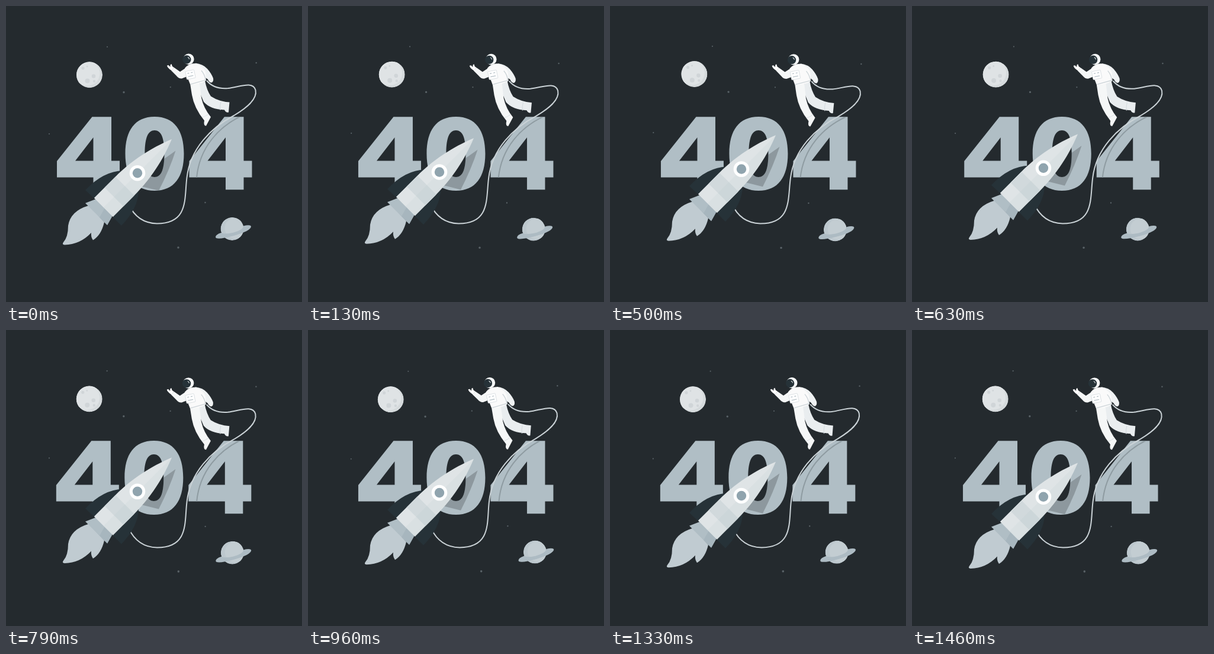
Write an HTML page that moves like this. It is 500 px wide and 500 px high and loops after 1500 ms.

```html
<!DOCTYPE html>
<html lang="en">
<head>
<meta charset="utf-8">
<title>404</title>
<style>
html, body { margin: 0; width: 100%; height: 100%; overflow: hidden; background: #242a2e; }
svg { display: block; width: 100%; height: 100%; }
</style>
</head>
<body>
<svg viewBox="0 0 500 500">
  <defs>
    <path id="four" d="M145.500 187.300H178V261.500H192V289.500H178V310.300H147.500V289.500H86V262ZM147.500 222L117 261.500H147.500Z" fill-rule="evenodd" clip-rule="evenodd"/>
    <path id="zero" d="M251 187C284 187 300.500 210 300.500 249.500S284 312 251 312S201.500 289 201.500 249.500S218 187 251 187ZM251 210C240.500 210 234.500 221 234.500 249.500S240.500 289 251 289S267.500 278 267.500 249.500S261.500 210 251 210Z" fill-rule="evenodd" clip-rule="evenodd"/>
    <path id="hull" d="M0 0C10 25 22.500 62 22.500 115V163H-22.500V115C-22.500 62 -10 25 0 0Z"/>
    <clipPath id="inFour"><use href="#four" x="223.500"/></clipPath>
    <clipPath id="inZero"><use href="#zero"/></clipPath>
    <clipPath id="inMoon"><circle cx="141" cy="116.300" r="22"/></clipPath>
    <clipPath id="inPlanet"><circle cx="382" cy="376.400" r="19.500"/></clipPath>
    <clipPath id="inHull"><use href="#hull"/></clipPath>
  </defs>
  <rect width="500" height="500" fill="#242a2e"/>

  <g id="digits" fill="#b0bec5">
    <use href="#four"/>
    <use href="#zero"/>
    <use href="#four" x="223.500"/>
    <g clip-path="url(#inZero)">
      <path id="rocketShade" d="M286.500 244.500Q276 277 258 312L230 305L222 290Z" fill="#000" opacity=".2"/>
    </g>
    <g clip-path="url(#inFour)">
      <path id="ropeShade" d="M397 186C360 204 327 238 322 290" fill="none" stroke="#8e9ba1" stroke-width="2"/>
    </g>
  </g>

  <g id="space">
    <g fill="#596267">
      <circle cx="171" cy="69" r="1.100"/>
      <circle cx="73" cy="216" r="1.100"/>
      <circle cx="199" cy="145.700" r="1.700"/>
      <circle cx="277.800" cy="137" r="1.100"/>
      <circle cx="422.700" cy="96" r="1.200"/>
      <circle cx="336.500" cy="332" r="1.200"/>
      <circle cx="291" cy="408" r="1.800"/>
    </g>

    <g clip-path="url(#inMoon)">
      <circle cx="141" cy="116.300" r="22" fill="#d5dadc"/>
      <circle cx="137" cy="113.300" r="21.500" fill="#dfe3e5"/>
      <g fill="#d0d5d8">
        <circle cx="137.500" cy="126.500" r="4"/>
        <circle cx="148" cy="118.500" r="3.300"/>
        <circle cx="130" cy="105" r="2.600"/>
        <circle cx="149" cy="127" r="2.200"/>
        <circle cx="137" cy="102" r="1.500"/>
      </g>
    </g>

    <g clip-path="url(#inPlanet)">
      <circle cx="382" cy="376.400" r="19.500" fill="#bcc7cd"/>
      <circle cx="387" cy="375.400" r="17.500" fill="#c3cdd2"/>
    </g>
    <path d="M354 390.500Q355 396 385 388Q413 380 414 372.500Q413 368.500 401 371.500Q401 378 383 383Q368 386 363.500 383Q354 386 354 390.500Z" fill="#adbbc3"/>

    <path d="M339 126C349 138 362 140 375 139C394 137 417 126 421.500 142C425 158 405 173 385 185C347 205 311 241 305.500 290C301 325 309 367.500 255 367.500C232 367 217 356 207 335" fill="none" stroke="#cbd3d7" stroke-width="2"/>

    <g id="astronaut">
      <path d="M322 133L336 126Q339 142 346 152.500Q360 161.500 377.500 162.500L376 179.500Q372 181 369 175.500Q345 174.500 334 162Q328 148 322 133Z" fill="#e9edef"/>
      <path d="M363 162Q361 169 362 176" fill="none" stroke="#d3dade"/>
      <path d="M311 131L327 130L330 155Q334 173 346 187.500L338 202.500Q333 202.500 335 193.500Q318 173 314 150Z" fill="#f5f7f7"/>
      <path d="M331 188Q337 187 342 182" fill="none" stroke="#dce1e4"/>
      <path d="M320 96.500Q333 98 340 106Q347 114 350 122Q351 128 347 129.500Q343 129 341 124L328 114Z" fill="#eff2f3"/>
      <path d="M284 104L294 111L306 103V119L297 122.500Q292 123 288 118L279 109Z" fill="#f5f7f7"/>
      <path d="M279.500 109Q272 104 272 100.500L274.500 100L277.500 103Q277 98.500 279.500 98L281 102L284 104Z" fill="#fff"/>
      <path d="M302 105Q309 96 321 97Q335 103 337 112L338 126Q325 134 311 132Q305 119 302 105Z" fill="#fafafa"/>
      <path d="M330 109Q336 116 337 125L312 132" fill="none" stroke="#cbd3d7" stroke-width="1.300"/>
      <circle cx="308.500" cy="89.700" r="9.200" fill="#f5f7f7"/>
      <circle cx="305.300" cy="90.500" r="7.200" fill="#263238"/>
      <path d="M307 86.500Q309.500 87.500 309.700 90" fill="none" stroke="#edf1f2"/>
      <g transform="rotate(-12 311 116)">
        <rect x="304" y="109" width="15" height="14" rx="1" fill="#fff" stroke="#d7dde0" stroke-width=".8"/>
        <path d="M307 113H310M313 113H316M307 118.500H316" stroke="#b7c2c8" stroke-width="1.300"/>
      </g>
    </g>
  </g>

  <g id="rocket">
    <path d="M140 337Q109 346 105 371Q105 390 97 399Q94 403 99 403.500Q125 403 144 383Q143 390 147 395.500Q161 387 166 365Z" fill="#c0cbd1"/>
    <path d="M152 326L180 354L171 370L134 333Z" fill="#b0bec5"/>
    <path d="M167 341L180 354L171 370L158 357Z" fill="#a7b6be"/>
    <path d="M198 278Q164 279 134 311L150 326ZM224 311Q224 341 195 371L179 355Z" fill="#263238"/>
    <g transform="translate(280 225) rotate(45)">
      <use href="#hull" fill="#dfe4e6"/>
      <g clip-path="url(#inHull)">
        <rect x="-30" y="112" width="60" height="26" fill="#d1d9dc"/>
        <rect width="30" height="170" fill="#90a4ae" opacity=".07"/>
      </g>
    </g>
    <circle cx="222" cy="282.200" r="13.300" fill="#fff"/>
    <circle cx="222" cy="282.200" r="8.200" fill="#90a4ae"/>
  </g>
</svg>
<script>
const LOOP = 1500;
const [digits, space, rocket, rocketShade, ropeShade] =
  ["digits", "space", "rocket", "rocketShade", "ropeShade"].map(id => document.getElementById(id));

// Cubic easing with a slight overshoot
const curve = (u, a, b) => 3 * (1 - u) * (1 - u) * u * a + 3 * (1 - u) * u * u * b + u * u * u;
function spring(x) {
  let lo = 0, hi = 1;
  for (let i = 0; i < 24; i++) {
    const mid = (lo + hi) / 2;
    if (curve(mid, .3, .47) < x) lo = mid; else hi = mid;
  }
  return curve(lo, .04, 1.35);
}

// Evenly spaced keys over one loop
function keyed(keys, p, ease) {
  const x = p * (keys.length - 1), i = Math.min(Math.floor(x), keys.length - 2);
  return keys[i] + (keys[i + 1] - keys[i]) * ease(x - i);
}

const linear = x => x;
const SHAKE = [0, -1, 2, -4, 4, -4, 4, -4, 2, -1, 0];
const SWAY = [0, 1, 0, -1, 0];
const FLOAT = [0, -10, 0];

function draw(ms) {
  const p = (ms % LOOP) / LOOP;
  const dx = keyed(SHAKE, p, spring);
  const dy = keyed(FLOAT, p, linear);
  const turn = `rotate(${keyed(SWAY, p, linear)} 249 239)`;
  digits.setAttribute("transform", `translate(${dx} 0)`);
  space.setAttribute("transform", turn);
  rocket.setAttribute("transform", `translate(0 ${dy})`);
  // Shadows follow their casters, not the shaking digits
  rocketShade.setAttribute("transform", `translate(${-dx} ${dy})`);
  ropeShade.setAttribute("transform", `translate(${-dx} 0) ${turn}`);
}

const start = performance.now();
function tick() {
  draw(performance.now() - start);
  requestAnimationFrame(tick);
}
tick();
</script>
</body>
</html>
```
